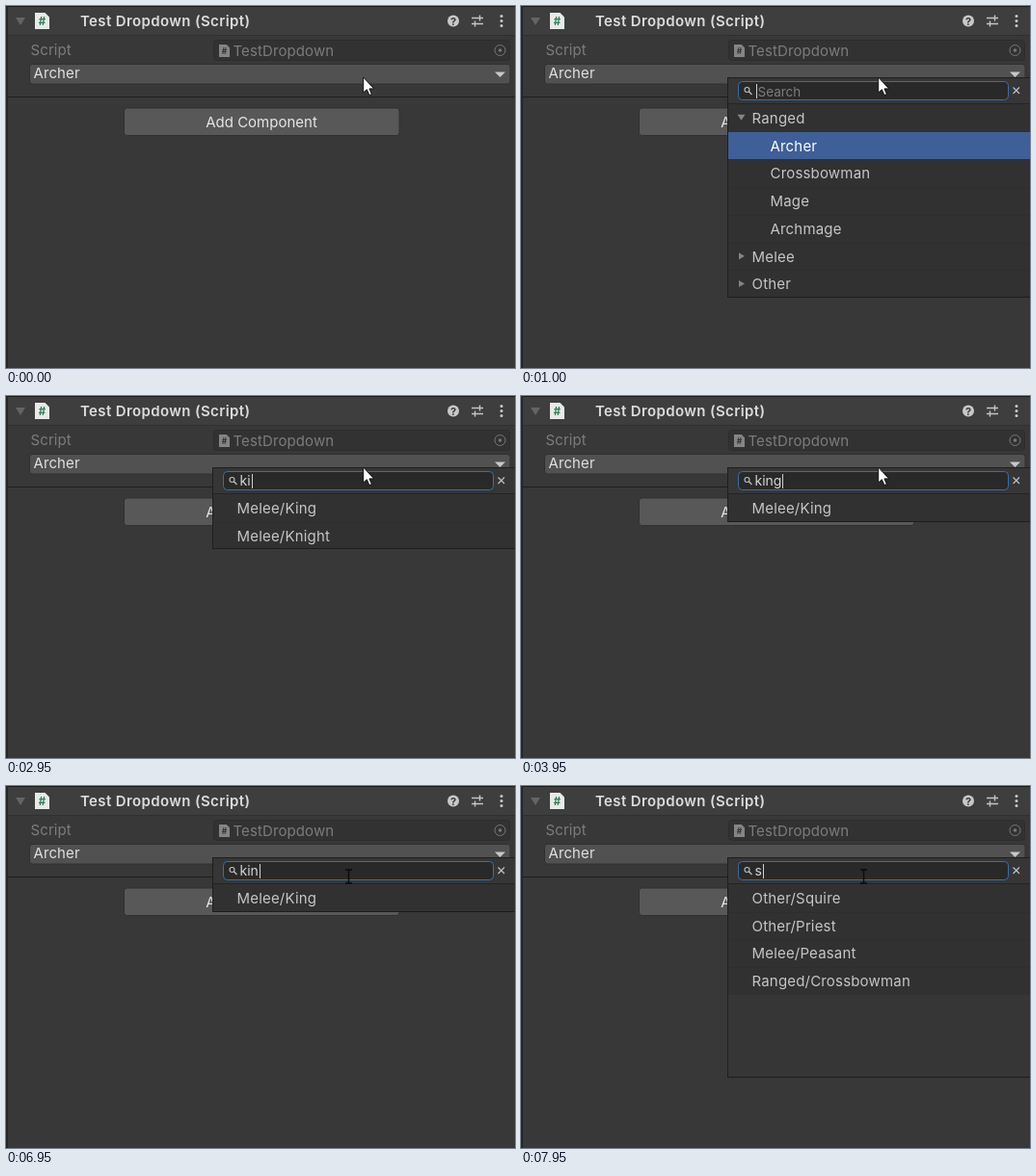
An HTML page with a canvas for the animation above (8 s loop, 528 by 376 pixels).

```html
<!DOCTYPE html>
<html lang="en">
<head>
<meta charset="utf-8">
<title>Dropdown search</title>
<style>
  html, body { margin: 0; width: 528px; height: 376px; overflow: hidden; background: #383838; }
  canvas { display: block; }
</style>
</head>
<body>
<canvas id="stage" width="528" height="376"></canvas>
<script>
const ctx = document.getElementById('stage').getContext('2d');
const LOOP = 8000, ROW = 28.7, LIST_TOP = 102, LEFT = 214, BOTTOM = 303;
const FONT = 'Inter, "Open Sans", sans-serif';

const tree = [
  ['Ranged', 'open'], ['Archer', 'picked'], ['Crossbowman'], ['Mage'], ['Archmage'],
  ['Melee', 'shut'], ['Other', 'shut']
];
const results = {
  k: ['Melee/King', 'Melee/Knight'],
  ki: ['Melee/King', 'Melee/Knight'],
  kin: ['Melee/King'],
  king: ['Melee/King'],
  s: ['Other/Squire', 'Other/Priest', 'Melee/Peasant', 'Ranged/Crossbowman']
};
// [time, text in the search field]
const typing = [
  [650, ''], [2450, 'k'], [2700, 'ki'], [3350, 'kin'], [3850, 'king'],
  [6950, 'kin'], [7100, 'ki'], [7200, 'k'], [7300, ''], [7900, 's']
];
// [time, x, y]
const mouse = [
  [0, 370.7, 74], [4950, 370.7, 74], [5250, 343.5, 94], [5650, 343.5, 94],
  [6050, 355.5, 94], [LOOP, 355.5, 94]
];

function rect(x, y, w, h, fill) {
  ctx.fillStyle = fill;
  ctx.fillRect(x, y, w, h);
}

function box(x, y, w, h, r, fill, stroke) {
  ctx.beginPath();
  ctx.roundRect(x, y, w, h, r);
  ctx.fillStyle = fill;
  ctx.fill();
  ctx.strokeStyle = stroke;
  ctx.lineWidth = 1;
  ctx.stroke();
}

function poly(points, fill, stroke) {
  ctx.beginPath();
  points.forEach(([x, y]) => ctx.lineTo(x, y));
  ctx.closePath();
  ctx.fillStyle = fill;
  ctx.fill();
  if (stroke) {
    ctx.strokeStyle = stroke;
    ctx.lineWidth = 1;
    ctx.stroke();
  }
}

function lines(color, width, ...segments) {
  ctx.beginPath();
  for (const [x1, y1, x2, y2] of segments) {
    ctx.moveTo(x1, y1);
    ctx.lineTo(x2, y2);
  }
  ctx.strokeStyle = color;
  ctx.lineWidth = width;
  ctx.stroke();
}

function circle(x, y, r, fill, stroke, width = 1) {
  ctx.beginPath();
  ctx.arc(x, y, r, 0, Math.PI * 2);
  if (fill) {
    ctx.fillStyle = fill;
    ctx.fill();
  }
  if (stroke) {
    ctx.strokeStyle = stroke;
    ctx.lineWidth = width;
    ctx.stroke();
  }
}

function text(str, x, y, color, { size = 15, weight = 400, align = 'left', spacing = 0 } = {}) {
  ctx.font = `${weight} ${size}px ${FONT}`;
  ctx.letterSpacing = `${spacing}px`;
  ctx.textAlign = align;
  ctx.fillStyle = color;
  ctx.fillText(str, x, y);
}

const down = (x, y, w, h, c) => poly([[x, y], [x + w, y], [x + w / 2, y + h]], c);

function scriptIcon(x, y, w, h, paper, ink) {
  const fold = w * 0.3;
  poly([[x, y], [x + w - fold, y], [x + w, y + fold], [x + w, y + h], [x, y + h]], paper);
  text('#', x + w / 2, y + h * 0.77, ink, { size: w * 0.76, weight: 700, align: 'center' });
}

function inspector() {
  rect(0, 0, 528, 376, '#383838');
  rect(0, 0, 528, 30, '#3e3e3e');
  rect(0, 0, 528, 1, '#1c1c1c');
  rect(0, 30, 528, 1, '#303030');
  rect(0, 94, 528, 1, '#1d1d1d');
  rect(0, 0, 2, 376, '#262626');

  down(10, 12, 10, 8, '#646464');
  scriptIcon(30, 7, 15, 17, '#e6ebe7', '#2f7d57');
  text('Test Dropdown (Script)', 77, 21, '#dcdcdc', { weight: 600, spacing: 0.38 });
  circle(464, 15.5, 6, '#c8c8c8');
  text('?', 464, 19.5, '#3a3a3a', { size: 11, weight: 700, align: 'center' });
  lines('#c4c4c4', 1.4, [483, 12.5, 495, 12.5], [483, 18.5, 495, 18.5],
    [491.5, 9.5, 491.5, 15.5], [486.5, 15.5, 486.5, 21.5]);
  for (const y of [10.5, 15.5, 20.5]) circle(514, y, 1.5, '#c8c8c8');

  text('Script', 25.5, 51, '#7c7c7c', { spacing: 0.1 });
  box(215.5, 35.5, 307, 21, 3, '#323232', '#2d2d2d');
  scriptIcon(221, 40, 11, 13, '#858585', '#323232');
  text('TestDropdown', 235.5, 52, '#7c7c7c', { spacing: 0.1 });
  circle(512.5, 46, 5.5, null, '#777');
  circle(512.5, 46, 1.8, '#777');

  box(24.5, 60.5, 498.5, 20.5, 3, '#515151', '#303030');
  text('Archer', 28.5, 75, '#e0e0e0', { spacing: 0.1 });
  down(507, 68.5, 11, 5.5, '#c8c8c8');

  box(122.5, 106, 285.5, 28.5, 3, '#585858', '#303030');
  text('Add Component', 265, 126, '#e6e6e6', { align: 'center' });
}

function drawRow([label, kind], i, grouped) {
  const top = LIST_TOP + i * ROW, mid = top + ROW / 2 + 0.5;
  if (i) rect(LEFT, Math.round(top), 314, 1, '#2e2e2e');
  if (kind === 'picked') rect(LEFT + 1, Math.round(top), 313, 28, '#3f5f98');
  if (kind === 'open') down(224.5, mid - 4, 8, 6, '#858585');
  if (kind === 'shut') poly([[226, mid - 4], [232, mid - 0.5], [226, mid + 3]], '#858585');
  const leaf = grouped && kind !== 'open' && kind !== 'shut';
  const color = kind === 'picked' ? '#fff' : '#c6c6c6';
  text(label, leaf ? 258.5 : 239.5, mid + 5.2, color, { spacing: 0.18 });
}

function searchBar(query) {
  rect(LEFT, 74, 314, 28, '#363636');
  rect(LEFT, 74, 314, 1, '#202020');
  rect(LEFT, 101, 314, 1, '#252525');
  box(225.5, 78.5, 280, 19, 4, '#292929', '#3a6ea8');
  circle(234.5, 87, 2.5, null, '#c0c0c0', 1.1);
  lines('#c0c0c0', 1.3, [236.3, 88.8, 239.5, 92]);
  if (query) text(query, 242.5, 93, '#d6d6d6', { size: 14 });
  else text('Search', 245.5, 93.5, '#7d7d7d', { size: 13.5 });
  ctx.font = `400 14px ${FONT}`;
  ctx.letterSpacing = '0px';
  rect(Math.round(243.5 + ctx.measureText(query).width), 81, 1, 15, '#cfcfcf');
  lines('#c4c4c4', 1.1, [510.5, 84.5, 517, 91], [517, 84.5, 510.5, 91]);
}

function popup(query, t) {
  const rows = query ? results[query].map(r => [r]) : tree;
  const opening = t < 700;
  const end = opening ? 198 : Math.round(LIST_TOP + rows.length * ROW);
  const bottom = query && query !== 's' ? end : BOTTOM;
  rect(LEFT, 74, 314, bottom - 74, opening ? '#000' : '#363636');
  searchBar(query);

  ctx.save();
  ctx.beginPath();
  ctx.rect(LEFT, LIST_TOP, 314, end - LIST_TOP);
  ctx.clip();
  rect(LEFT, LIST_TOP, 314, end - LIST_TOP, '#313131');
  rows.forEach((row, i) => drawRow(row, i, !query));
  ctx.restore();

  rect(LEFT, 74, 1, bottom - 74, '#1e1e1e');
  rect(LEFT, bottom - 1, 314, 1, '#1e1e1e');
}

function pointer(t) {
  const i = mouse.findIndex(m => m[0] > t);
  const [t0, x0, y0] = mouse[i - 1], [t1, x1, y1] = mouse[i];
  const p = (t - t0) / (t1 - t0), e = p * p * (3 - 2 * p);
  const x = x0 + (x1 - x0) * e, y = y0 + (y1 - y0) * e;
  if (y > 79) {
    lines('#0a0a0a', 1.4, [x, y - 6.5, x, y + 6.5],
      [x - 3.5, y - 7, x + 3.5, y - 7], [x - 3.5, y + 7, x + 3.5, y + 7]);
    return;
  }
  const shape = [[0, 0], [0, 16], [3.6, 12.7], [6.2, 18.6], [8.7, 17.5], [6.2, 11.9], [11, 11.9]];
  poly(shape.map(([dx, dy]) => [x + dx, y + dy]), '#fff', '#111');
}

function frame(now) {
  const t = now % LOOP;
  inspector();
  const typed = typing.filter(k => k[0] <= t).pop();
  if (typed) popup(typed[1], t);
  pointer(t);
  requestAnimationFrame(frame);
}
requestAnimationFrame(frame);
</script>
</body>
</html>
```
